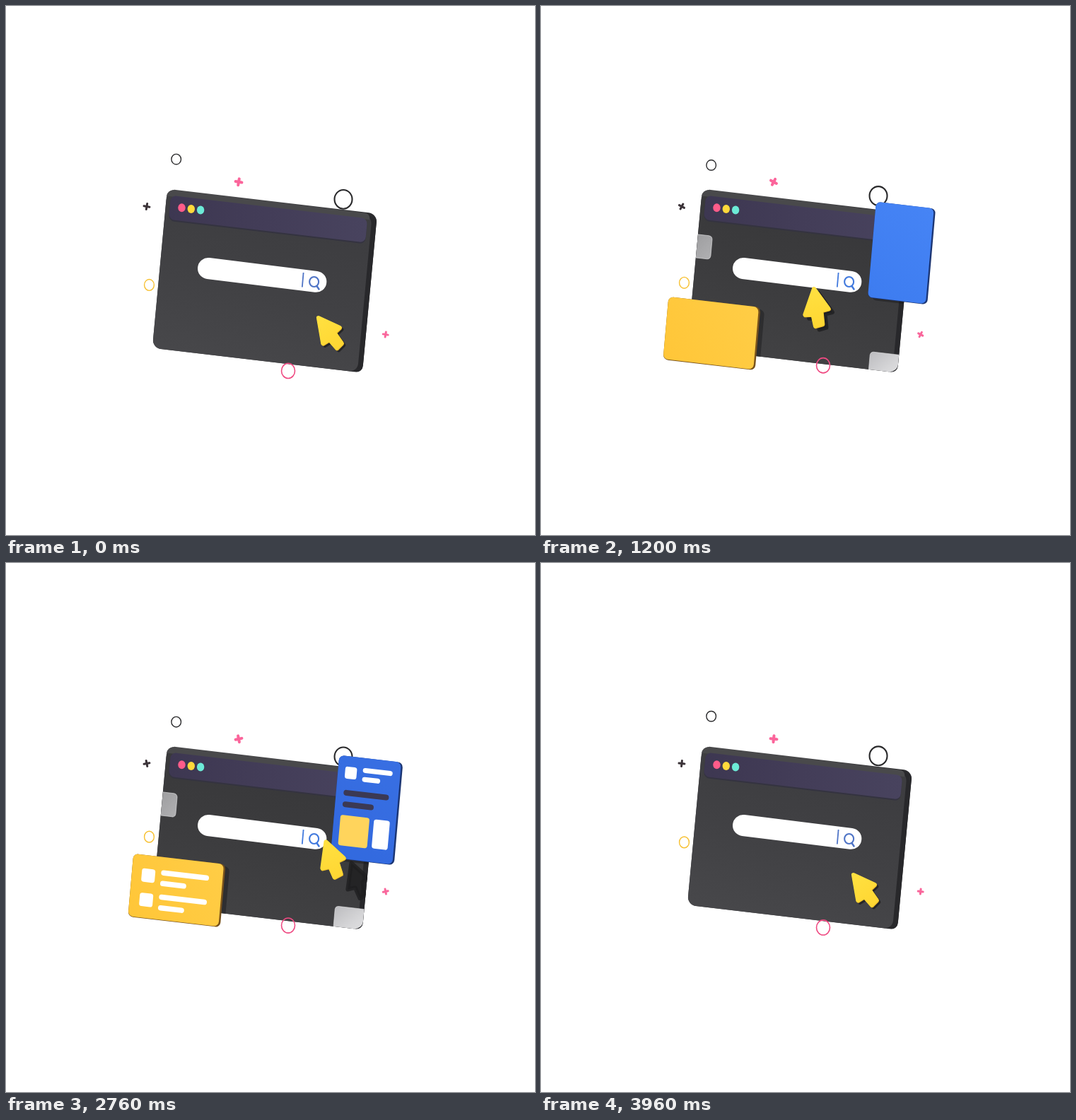
Write an HTML page with a canvas that moves like this. It is 748x748 px and loops after 4 s.

```html
<!DOCTYPE html>
<html lang="en">
<head>
<meta charset="utf-8">
<title>Search window</title>
<style>
  html, body { margin: 0; width: 100%; height: 100%; overflow: hidden; background: #fff; }
  canvas { display: block; }
</style>
</head>
<body>
<canvas id="stage" width="748" height="748"></canvas>
<script>
const ctx = document.getElementById('stage').getContext('2d');
const LOOP = 4000, TAU = Math.PI * 2, DEGREE = Math.PI / 180;
const WINDOW = { x: 228, y: 258.5, w: 297, h: 225 };
const BLUE = {
  x: 510, y: 349.5, w: 90, h: 145, face: ['#3d7cf0', '#4684f5'], side: '#1c3674',
  peak: 1070, exit: 2945
};
const YELLOW = {
  x: 241.5, y: 463, w: 131, h: 89.5, face: ['#ffc638', '#ffcd46'], side: '#79531c',
  peak: 1337, exit: 3130
};

const HOME = { x: 439, y: 438, turn: 0 };
const LEGS = [
  { start: 160, length: 600, x: 385, y: 396, turn: 29, bow: 0 },
  { start: 1180, length: 760, x: 295, y: 468, turn: -2, bow: 0 },
  { start: 1950, length: 1090, x: 481, y: 397, turn: 26, bow: -25 },
  { start: 3320, length: 600, ...HOME, bow: 0 }
];

const progress = (t, start, length) => Math.min(1, Math.max(0, (t - start) / length));
const smooth = (t, start, length) => {
  const p = progress(t, start, length);
  return p * p * (3 - 2 * p);
};
const grow = (t, start, length) => 1 - (1 - progress(t, start, length)) ** 2;
const pulse = (t, start, length) => Math.sin(Math.PI * progress(t, start, length));
const wave = (t, mid, size, peak) => mid + size * Math.cos(TAU * (t - peak) / 2000);

// Rise past full size, then ring down around it.
function spring(t, peak) {
  const rise = 330, swing = 200, past = t - peak;
  if (past < -rise) return 0;
  if (past < 0) return 1.2 * (1 - (past / rise) ** 2);
  return 1 + .2 * .6 ** (past / swing) * Math.cos(Math.PI * past / swing);
}

// Swell a little, then shrink to nothing.
function backOut(t, start) {
  const p = progress(t, start, 820), pull = 1.7;
  return 1 - p * p * ((pull + 1) * p - pull);
}

const cardScale = (card, t) => spring(t, card.peak) * backOut(t, card.exit);

function gradient(x0, y0, x1, y1, colors) {
  const g = ctx.createLinearGradient(x0, y0, x1, y1);
  colors.forEach((c, i) => g.addColorStop(i / (colors.length - 1), c));
  return g;
}

function box(x, y, w, h, r, fill) {
  ctx.beginPath();
  ctx.roundRect(x, y, w, h, r);
  ctx.fillStyle = fill;
  ctx.fill();
}

function line(x0, y0, x1, y1, width, color, cap = 'round') {
  ctx.beginPath();
  ctx.moveTo(x0, y0);
  ctx.lineTo(x1, y1);
  ctx.lineWidth = width;
  ctx.lineCap = cap;
  ctx.strokeStyle = color;
  ctx.stroke();
}

function ring(x, y, rx, ry, width, color) {
  ctx.beginPath();
  ctx.ellipse(x, y, rx, ry, 0, 0, TAU);
  ctx.lineWidth = width;
  ctx.strokeStyle = color;
  ctx.stroke();
}

// Paint in the slanted plane of the scene, around a given point.
function slanted(x, y, scale, paint) {
  ctx.save();
  ctx.translate(x, y);
  ctx.transform(scale, .117 * scale, -.088 * scale, scale, 0, 0);
  paint();
  ctx.restore();
}

function onWindow(paint) {
  ctx.save();
  ctx.transform(1, .118, -.094, 1, WINDOW.x, WINDOW.y);
  paint();
  ctx.restore();
}

function insideWindow(paint) {
  const outline = new Path2D(), plain = new Path2D();
  plain.roundRect(0, 0, WINDOW.w, WINDOW.h, 12);
  outline.addPath(plain, new DOMMatrix([1, .118, -.094, 1, WINDOW.x, WINDOW.y]));
  ctx.save();
  ctx.clip(outline);
  paint();
  ctx.restore();
}

function drawWindow(t) {
  const light = 1 - smooth(t, 0, 800) + smooth(t, 3300, 620);
  const grey = v => `rgb(${v + 5 * light},${v + 5 * light},${v + 2 + 6 * light})`;
  onWindow(() => {
    box(0, 0, WINDOW.w, WINDOW.h, 12, gradient(0, 0, 297, 0, ['#4a4a4c', '#474749', '#29292c']));
    box(285, 4, 12, 221, [4, 10, 12, 4], '#28282b');
    box(0, 4, 290, 221, 12, gradient(90, 0, 50, 225, [grey(56), grey(60), grey(66)]));
    box(0, 1, 287, 9, [10, 8, 0, 0], '#49494b');
    box(6, 9.5, 278, 35, 8, '#343340');
    box(6, 8.5, 278, 34, 8, gradient(0, 0, 284, 0, ['#3d3751', '#433d58', '#48435e']));
  });
  ['#ff5c8a', '#ffd93b', '#6cead7'].forEach((color, i) => {
    ctx.beginPath();
    ctx.ellipse(248.5 + 13.3 * i, 285.2 + 1.7 * i, 5.2, 6, 0, 0, TAU);
    ctx.fillStyle = color;
    ctx.fill();
  });
  const ink = light > .5 ? '#4f74c6' : '#4179dd';
  line(286, 371, 438.3, 389.8, 30, '#fff');
  line(420.6, 377, 418.8, 397.5, 1.8, ink, 'butt');
  ring(435.6, 390, 6.5, 7, 2.1, ink);
  line(439.5, 396, 442.5, 400.5, 2.4, ink);
}

function drawGlass(t) {
  const scale = smooth(t, 560, 220) - smooth(t, 3160, 280);
  if (scale <= 0) return;
  const pane = (x, y, w, h, colors) => slanted(x, y, scale, () => {
    box(-w / 2, -h / 2, w, h, 5, gradient(-w / 2, -h / 2, w / 2, h / 2, colors));
    ctx.lineWidth = 1;
    ctx.strokeStyle = 'rgba(230,230,232,.6)';
    ctx.stroke();
  });
  insideWindow(() => {
    pane(221, wave(t, 342.7, 3.6, 60), 40, 33, ['#979799', '#b0b0b2']);
    pane(486, wave(t, 516, 4.5, 1750), 45, 48, ['#bcbcbf', '#d6d6d8', '#e8e8e9']);
  });
}

function drawCardShadow(card, t) {
  const scale = cardScale(card, t);
  if (scale <= 0) return;
  insideWindow(() => slanted(card.x, card.y, scale, () =>
    box(-card.w / 2 + 6, -card.h / 2 + 3, card.w, card.h, 7, 'rgba(18,18,20,.38)')));
}

function drawCard(card, t, shade, paint) {
  const scale = cardScale(card, t);
  if (scale <= 0) return;
  const { w, h } = card;
  slanted(card.x, card.y, scale, () => {
    box(-w / 2, -h / 2, w, h, 7, card.side);
    box(-w / 2, -h / 2, w - 2.5, h - .8, 7, gradient(-w / 2, h / 2, w / 2, -h / 2, card.face));
    box(-w / 2, -h / 2, w - 2.5, h - .8, 7, `rgba(10,40,160,${shade})`);
    paint();
  });
}

// Tile that grows out of its middle.
function tile(cx, cy, w, h, p, color = '#fff') {
  if (p > 0) box(cx - w * p / 2, cy - h * p / 2, w * p, h * p, 3.5 * p, color);
}

function bar(x, y, length, p, width = 7.5, color = '#fff') {
  if (p > 0) line(x, y, x + length * p, y, width * Math.min(1, p * 3), color);
}

function blueContent(t) {
  tile(-26.7, -49.4, 16.5, 17, grow(t, 1440, 280));
  [35, 18.5].forEach((length, i) =>
    bar(-6.7, -55.2 + 12.7 * i, length, grow(t, 1600 + 40 * i, 490), 7));
  [56, 36].forEach((length, i) =>
    bar(-30.5, -21 + 16.4 * i, length, grow(t, 1780 + 50 * i, 480), 8, '#3b3954'));
  tile(-15.4, 32, 41, 43, grow(t, 1880, 400), '#ffd45c');
  tile(22.7, 32, 22.5, 41, grow(t, 1940, 380));
}

function yellowContent(t) {
  for (let row = 0; row < 2; row++) {
    const y = 34.5 * row, delay = 160 * row, length = 560 + 60 * row;
    tile(-41.9, -16.2 + y, 19, 19, grow(t, 1700 + 1.5 * delay, 300));
    bar(-20.5, -22.5 + y, 60.5, grow(t, 1860 + delay, length));
    bar(-20.5, -7.3 + y, 29.5, grow(t, 1890 + delay, length));
  }
}

function cross(t, x, y, size, width, color) {
  const arm = (size - width) / 2;
  ctx.save();
  ctx.translate(x, y);
  ctx.rotate(10 * DEGREE + TAU * t / LOOP);
  line(-arm, 0, arm, 0, width, color);
  line(0, -arm, 0, arm, width, color);
  ctx.restore();
}

function drawOrnaments(t) {
  ring(240.7, wave(t, 221.3, 4.6, 1000), 6.8, 7.3, 1.4, '#2b2b2d');
  ring(477, wave(t, 272, 4.3, 400), 12.5, 13.4, 2.1, '#29292b');
  ring(399, wave(t, 512.7, 4.5, 250), 9.5, 10.6, 1.6, '#ef4a82');
  ring(202.5, wave(t, 391.6, 4.5, 1720), 6.9, 7.9, 1.4, '#f7c030');
  cross(t, 329, 248.8, 13, 4, '#fb659b');
  cross(t, 199, 283.5, 11, 3, '#3b3338');
  cross(t, 536.7, 464.5, 10, 3, '#f9669b');
}

function drawBurst(t) {
  const p = progress(t, 760, 160);
  if (p === 0 || p === 1) return;
  ctx.save();
  ctx.translate(389, 395);
  ctx.globalAlpha = Math.min(1, 4 * (1 - p));
  for (let i = 0; i < 3; i++) {
    const angle = (49 * i - 172) * DEGREE, near = 8 + 6 * p, far = near + 8;
    const dx = Math.cos(angle), dy = Math.sin(angle);
    line(dx * near, dy * near, dx * far, dy * far, 3.4, '#263058', 'butt');
  }
  ctx.restore();
}

function pointerPose(t) {
  const pose = { ...HOME };
  for (const leg of LEGS) {
    const p = smooth(t, leg.start, leg.length);
    pose.x += (leg.x - pose.x) * p;
    pose.y += (leg.y - pose.y) * p + leg.bow * pulse(t, leg.start, leg.length);
    pose.turn += (leg.turn - pose.turn) * p * p;
  }
  const tap = pulse(t, 760, 160);
  pose.x += 4 * tap;
  pose.y -= 3 * tap;
  pose.lift = smooth(t, 1120, 450) - smooth(t, 3330, 500);
  return pose;
}

function pointerShape(x, y, turn, fill) {
  const size = 1 + turn / 600;
  ctx.save();
  ctx.translate(x, y);
  ctx.rotate(turn * DEGREE);
  ctx.scale(size, size);
  ctx.beginPath();
  [[2.7, 2.7], [32.5, 16.5], [25, 23.5], [35.5, 38.5], [28.5, 45.5], [18, 33.5], [9, 39]]
    .forEach(point => ctx.lineTo(...point));
  ctx.closePath();
  ctx.lineJoin = 'round';
  ctx.lineWidth = 5.6;
  ctx.fillStyle = ctx.strokeStyle = fill;
  ctx.fill();
  ctx.stroke();
  ctx.restore();
}

function drawPointerShadow({ x, y, turn, lift }) {
  insideWindow(() =>
    pointerShape(x + 3 + 33 * lift, y + 3 + 27 * lift, turn, 'rgba(30,30,32,.8)'));
}

function drawPointer({ x, y, turn }) {
  pointerShape(x + .7, y + .9, turn, '#efbd28');
  pointerShape(x, y, turn, gradient(4, 4, 30, 44, ['#ffe040', '#ffd733']));
}

function draw(t) {
  const pose = pointerPose(t);
  ctx.fillStyle = '#fff';
  ctx.fillRect(0, 0, 748, 748);
  drawWindow(t);
  drawGlass(t);
  drawCardShadow(BLUE, t);
  drawCardShadow(YELLOW, t);
  drawPointerShadow(pose);
  drawOrnaments(t);
  drawCard(BLUE, t, .22 * smooth(t, 1700, 600), () => blueContent(t));
  drawCard(YELLOW, t, 0, () => yellowContent(t));
  drawBurst(t);
  drawPointer(pose);
}

const begin = performance.now();
function tick() {
  const t = Math.floor((performance.now() - begin) % LOOP / 40) * 40;
  draw(t < 80 ? 0 : t);
  requestAnimationFrame(tick);
}
tick();
</script>
</body>
</html>
```
